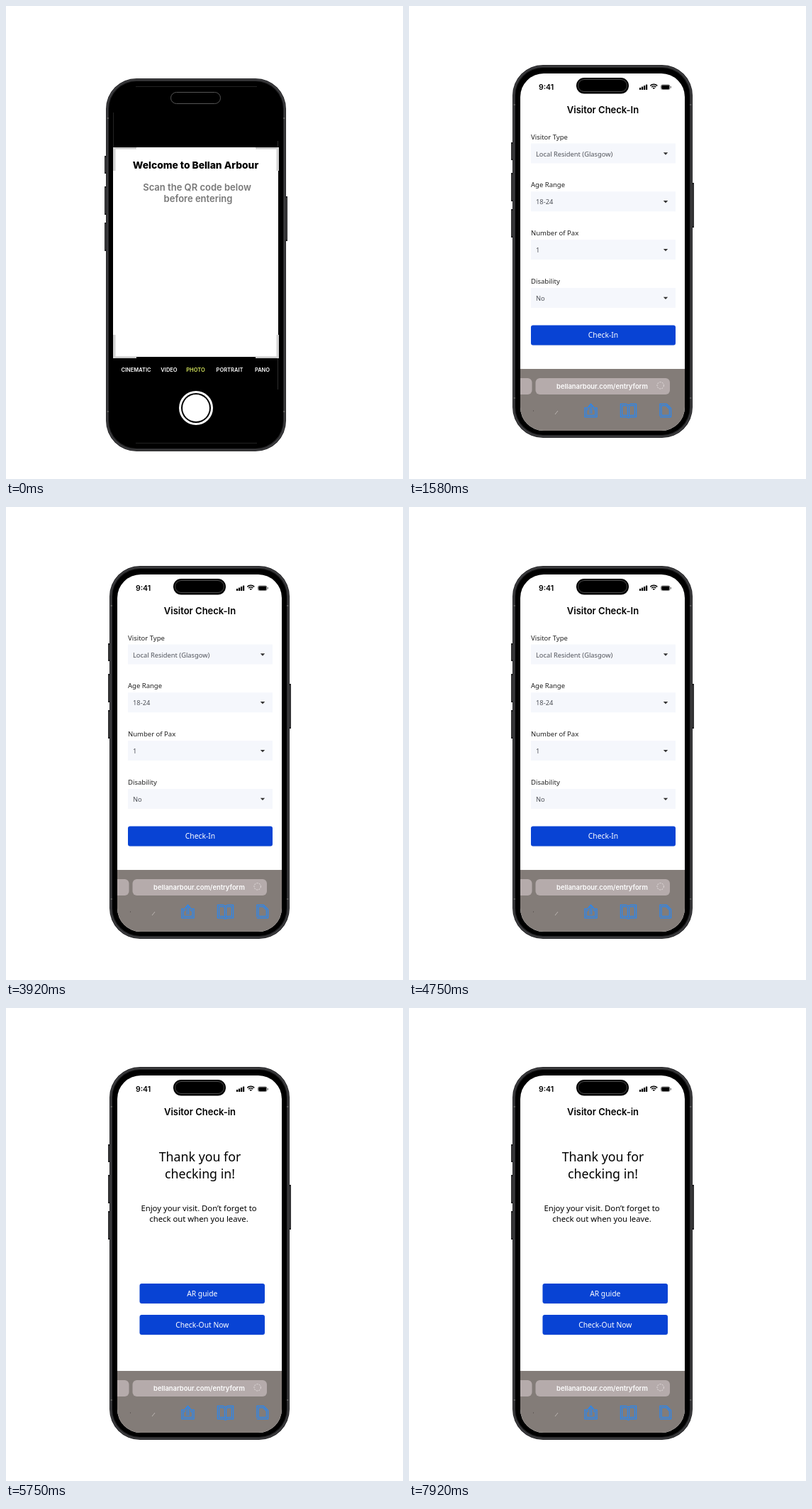
These frames come from a looping animation (560 by 666 pixels, 8 s). An HTML page with a canvas:

```html
<!DOCTYPE html>
<html lang="en">
<head>
<meta charset="utf-8">
<title>Visitor check-in</title>
<style>
html, body { margin: 0; width: 560px; height: 666px; overflow: hidden; background: #fff; }
canvas { display: block; }
</style>
</head>
<body>
<canvas id="stage" width="560" height="666"></canvas>
<script>
const ctx = document.getElementById('stage').getContext('2d');
const LOOP = 8000, FORM_AT = 1580, THANKS_AT = 4920;
const INTER = 'Inter, sans-serif', SANS = '"Noto Sans", sans-serif';
const BLUE = '#0843d4', ICON = '#2b86ee', BAR = '#837c78', PILL = '#b5abab';

function rect(x, y, w, h, color) {
  ctx.fillStyle = color;
  ctx.fillRect(x, y, w, h);
}

function roundPath(x, y, w, h, r) {
  ctx.beginPath();
  ctx.roundRect(x, y, w, h, r);
}

function round(x, y, w, h, r, color) {
  roundPath(x, y, w, h, r);
  ctx.fillStyle = color;
  ctx.fill();
}

function outline(x, y, w, h, r, color) {
  roundPath(x, y, w, h, r);
  ctx.strokeStyle = color;
  ctx.lineWidth = 1;
  ctx.stroke();
}

function disc(x, y, r, color) {
  ctx.beginPath();
  ctx.arc(x, y, r, 0, Math.PI * 2);
  ctx.fillStyle = color;
  ctx.fill();
}

function text(str, x, y, font, color = '#000', align = 'center') {
  ctx.font = font;
  ctx.fillStyle = color;
  ctx.textAlign = align;
  ctx.fillText(str, x, y);
}

function line(points, color, width) {
  ctx.beginPath();
  points.forEach(([x, y]) => ctx.lineTo(x, y));
  ctx.strokeStyle = color;
  ctx.lineWidth = width;
  ctx.stroke();
}

function phone(dx, dy) {
  ctx.save();
  ctx.translate(dx, dy);
  for (const [y, h] of [[192, 25], [235, 40], [286, 40]]) {
    rect(144, y, 3, h, '#1d1d1f');
    rect(145, y + 2, 1, h - 4, '#4b4b4d');
  }
  rect(399, 249, 3, 63, '#1d1d1f');
  rect(400, 251, 1, 59, '#4b4b4d');
  const layers = [[0, '#1b1b1d'], [1, '#47474a'], [2.2, '#2b2b2d'], [4, '#000']];
  for (const [inset, color] of layers) {
    round(146 + inset, 83 + inset, 254 - 2 * inset, 525 - 2 * inset, 43 - inset, color);
  }
  for (const y of [138, 551]) {
    rect(147, y, 3, 2, '#555');
    rect(396, y, 3, 2, '#555');
  }
  ctx.restore();
}

function scanScene() {
  phone(-5, 19);
  rect(183, 113, 171, 1, '#222');
  rect(183, 615, 171, 1, '#222');
  rect(151, 150, 1, 49, '#242424');
  rect(383, 190, 1, 350, '#2e2e2e');
  outline(232.5, 121.5, 70, 16, 8, '#555');

  rect(151, 199, 233, 295, '#fff');
  for (const [x, y, sx, sy] of [[151, 199, 1, 1], [385, 199, -1, 1], [151, 496, 1, -1], [385, 496, -1, -1]]) {
    ctx.save();
    ctx.translate(x, y);
    ctx.scale(sx, sy);
    rect(0, 0, 33, 2.5, '#c9c9c9');
    rect(0, 0, 3.5, 33, '#d2d2d2');
    ctx.restore();
  }

  text('Welcome to Bellan Arbour', 267.5, 229, '800 13.8px ' + INTER);
  text('Scan the QR code below', 269.5, 260, '600 13px ' + INTER, '#777');
  text('before entering', 271, 276, '600 13px ' + INTER, '#777');

  const modes = [['CINEMATIC', 183.5], ['VIDEO', 230], ['PHOTO', 267.5], ['PORTRAIT', 315.5], ['PANO', 361.5]];
  for (const [name, x] of modes) {
    text(name, x, 515, '600 7.5px ' + INTER, name === 'PHOTO' ? '#d9ea5e' : '#fff');
  }
  disc(268, 566, 24, '#fff');
  disc(268, 566, 21, '#000');
  disc(268, 566, 19, '#fff');
}

function statusBar() {
  text('9:41', 193.5, 118, '600 10.5px ' + INTER);
  round(236, 101, 74, 22.5, 11.2, '#000');
  outline(238.5, 103.5, 69, 17, 8.5, '#4a4a4a');
  for (let i = 0; i < 4; i++) {
    const h = 3 + i * 1.5;
    round(325 + i * 3, 118 - h, 2.2, h, 0.6, '#000');
  }
  ctx.strokeStyle = '#000';
  ctx.lineWidth = 1.5;
  for (const r of [7, 4.3, 1.6]) {
    ctx.beginPath();
    ctx.arc(345.3, 117.3, r, -Math.PI * 0.75, -Math.PI * 0.25);
    ctx.stroke();
  }
  outline(355.5, 111, 12.5, 6.5, 2, '#777');
  round(356.3, 111.6, 11, 5.3, 1.3, '#000');
  rect(369, 113, 1, 2.5, '#777');
}

// Thick stroke with a thin bar-coloured core, giving a hollow outline.
function hollow(points) {
  line(points, ICON, 3.4);
  line(points, BAR, 1);
}

function browserBar() {
  rect(157, 511, 232, 87, BAR);
  round(150, 524, 23.5, 23, 6, PILL);
  round(178.5, 524, 189.5, 23, 6, PILL);
  text('bellanarbour.com/entryform', 272.5, 538.5, '600 9.4px ' + INTER, '#fff');
  ctx.setLineDash([2, 1.4]);
  ctx.beginPath();
  ctx.arc(354.7, 534.3, 4.7, 0, Math.PI * 2);
  ctx.strokeStyle = '#e6e0e0';
  ctx.lineWidth = 1;
  ctx.stroke();
  ctx.setLineDash([]);
  line([[206, 575], [210, 570]], '#b9b3b0', 1);
  rect(175, 569, 1, 2, '#66605d');

  hollow([[253, 567], [249, 567], [249, 577.5], [264, 577.5], [264, 567], [260, 567]]);
  hollow([[256.5, 574], [256.5, 562]]);
  line([[252.5, 565], [256.5, 560.5], [260.5, 565]], ICON, 1.5);
  hollow([[309.5, 563], [306, 561.5], [299.5, 561.5], [299.5, 577.5], [306, 577.5],
    [309.5, 579], [313, 577.5], [319.5, 577.5], [319.5, 561.5], [313, 561.5], [309.5, 563], [309.5, 578]]);
  hollow([[355, 577.5], [355, 561.5], [363, 561.5], [368.5, 567], [368.5, 577.5], [354, 577.5]]);
}

function browserScene(title, content) {
  phone(0, 0);
  ctx.save();
  roundPath(157, 95, 232, 503, 33);
  ctx.clip();
  rect(157, 95, 232, 503, '#fff');
  statusBar();
  text(title, 273.5, 151, '600 13px ' + INTER);
  content();
  browserBar();
  ctx.restore();
}

function button(label, x, y, w) {
  round(x, y + 0.7, w, 28, 3, '#dfe3ef');
  round(x, y, w, 28, 3, BLUE);
  text(label, x + w / 2, y + 17.7, '500 10.3px ' + SANS, '#fff');
}

function form() {
  const fields = [['Visitor Type', 'Local Resident (Glasgow)'], ['Age Range', '18-24'],
    ['Number of Pax', '1'], ['Disability', 'No']];
  fields.forEach(([label, value], i) => {
    const y = 193.5 + i * 67.8;
    text(label, 172, y - 6, '9.5px ' + SANS, '#222', 'left');
    rect(172, y, 204, 28, '#f5f7fc');
    text(value, 179, y + 18, '9.3px ' + SANS, '#50535a', 'left');
    ctx.beginPath();
    ctx.moveTo(358.8, y + 12.8);
    ctx.lineTo(365.2, y + 12.8);
    ctx.lineTo(362, y + 16.2);
    ctx.fillStyle = '#333';
    ctx.fill();
  });
  button('Check-In', 172, 449.5, 204);
}

function thanks() {
  text('Thank you for', 273.5, 215.5, '500 17.8px ' + SANS);
  text('checking in!', 273.5, 240, '500 17.8px ' + SANS);
  text('Enjoy your visit. Don’t forget to', 272, 286, '500 11.3px ' + SANS);
  text('check out when you leave.', 272, 301, '500 11.3px ' + SANS);
  button('AR guide', 188.5, 388, 176.5);
  button('Check-Out Now', 188.5, 432, 176.5);
}

function draw(now) {
  const t = now % LOOP;
  rect(0, 0, 560, 666, '#fff');
  if (t < FORM_AT) scanScene();
  else if (t < THANKS_AT) browserScene('Visitor Check-In', form);
  else browserScene('Visitor Check-in', thanks);
}

const start = performance.now();
function tick() {
  draw(performance.now() - start);
  requestAnimationFrame(tick);
}
tick();
</script>
</body>
</html>
```
